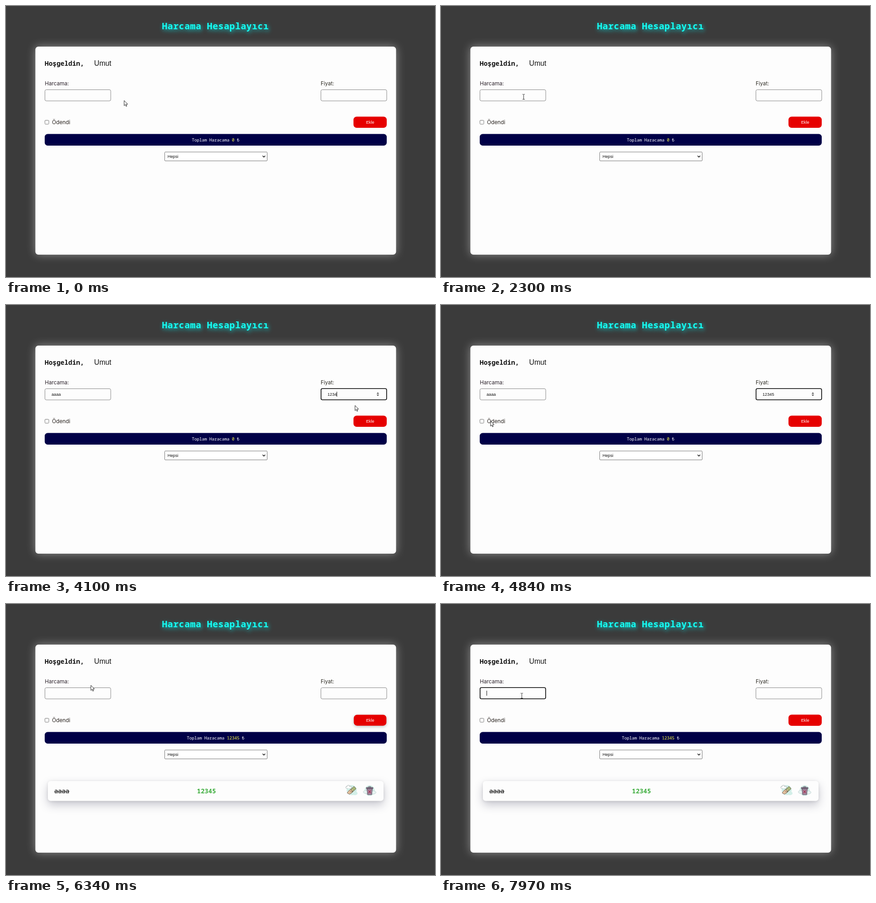
An HTML page with a canvas that plays this animation: 942 px wide and 594 px high, repeating every 8 s.

```html
<!DOCTYPE html>
<html lang="tr">
<head>
<meta charset="utf-8">
<title>Harcama Hesaplayıcı</title>
<style>
  html, body { margin: 0; width: 100%; height: 100%; overflow: hidden; background: #3b3b3b; }
  canvas { display: block; width: 942px; height: 594px; }
</style>
</head>
<body>
<canvas id="stage"></canvas>
<script>
const W = 942, H = 594, LOOP = 8000;
const canvas = document.getElementById('stage');
const ctx = canvas.getContext('2d');
const dpr = window.devicePixelRatio || 1;
canvas.width = W * dpr;
canvas.height = H * dpr;

const MONO = '"Noto Sans Mono", "DejaVu Sans Mono", monospace';
const LABEL = 'Inter, sans-serif';
const ARIAL = '"Liberation Sans", Arial, sans-serif';
const CARD = '#fdfdfd';

// Moments when the form changes
const AT = { focusName: 2560, focusPrice: 3380, check: 5010, add: 5960, refocus: 6500 };
const NAME_KEYS = [2700, 2800, 2900, 3000];
const PRICE_KEYS = [3620, 3760, 3900, 4040, 4190];

// Pointer path: time, x, y
const PATH = [
  [0, 259, 207], [120, 259, 207], [780, 152, 198], [950, 152, 198],
  [1500, 174, 201], [2200, 181, 199], [3020, 181, 199], [3340, 752, 197],
  [3800, 758, 200], [4060, 766, 220], [4300, 766, 220], [4900, 90, 255],
  [5120, 90, 255], [5620, 872, 252], [5690, 872, 252], [5860, 804, 256],
  [6040, 802, 256], [6310, 186, 178], [6370, 186, 178], [6470, 177, 199],
  [7000, 177, 201], [8000, 177, 201]
];

const clamp = v => Math.max(0, Math.min(1, v));
const ease = v => { v = clamp(v); return v * v * (3 - 2 * v); };
const typed = (keys, t) => keys.filter(k => t >= k).length;

function pointerAt(t) {
  const i = Math.max(1, PATH.findIndex(p => p[0] > t));
  const [t0, x0, y0] = PATH[i - 1], [t1, x1, y1] = PATH[i];
  const k = ease((t - t0) / (t1 - t0));
  return { x: x0 + (x1 - x0) * k, y: y0 + (y1 - y0) * k };
}

function caretOn(t, keys, start) {
  const last = keys.filter(k => k <= t).pop() || start;
  return (t - last) % 1000 < 500;
}

function text(str, x, y, font, color, spacing = 0) {
  ctx.font = font;
  ctx.letterSpacing = spacing + 'px';
  ctx.fillStyle = color;
  ctx.fillText(str, x, y);
  const width = ctx.measureText(str).width;
  ctx.letterSpacing = '0px';
  return width;
}

function box(x, y, w, h, r, fill, stroke, line = 1) {
  ctx.beginPath();
  ctx.roundRect(x, y, w, h, r);
  if (fill) { ctx.fillStyle = fill; ctx.fill(); }
  if (stroke) { ctx.strokeStyle = stroke; ctx.lineWidth = line; ctx.stroke(); }
}

function withShadow(color, blur, dx, dy, draw) {
  ctx.save();
  ctx.shadowColor = color;
  ctx.shadowBlur = blur * dpr;
  ctx.shadowOffsetX = dx * dpr;
  ctx.shadowOffsetY = dy * dpr;
  draw();
  ctx.restore();
}

function poly(points, fill, stroke, line = 1, closed = true) {
  ctx.beginPath();
  points.forEach(([x, y], i) => i ? ctx.lineTo(x, y) : ctx.moveTo(x, y));
  if (closed) ctx.closePath();
  if (fill) { ctx.fillStyle = fill; ctx.fill(); }
  if (stroke) { ctx.strokeStyle = stroke; ctx.lineWidth = line; ctx.stroke(); }
}

function oval(x, y, rx, ry, fill, stroke, line = 0.8) {
  ctx.beginPath();
  ctx.ellipse(x, y, rx, ry, 0, 0, Math.PI * 2);
  if (fill) { ctx.fillStyle = fill; ctx.fill(); }
  if (stroke) { ctx.strokeStyle = stroke; ctx.lineWidth = line; ctx.stroke(); }
}

function input(x, value, focused, caret) {
  if (focused) box(x + 0.75, 183.25, 144, 24.5, 3, CARD, '#000', 1.6);
  else box(x + 0.5, 183.5, 144.5, 24.5, 3, CARD, '#858585');
  const width = text(value, x + 15, 199, '9.2px ' + ARIAL, '#111');
  if (caret) {
    ctx.fillStyle = '#111';
    ctx.fillRect(Math.round(x + 14.6 + width), 190, 1, 11);
  }
}

function spinner(x, y) {
  poly([[x - 2.7, y - 1], [x + 2.7, y - 1], [x, y - 4]], '#444');
  poly([[x - 2.7, y + 1], [x + 2.7, y + 1], [x, y + 4]], '#444');
}

function checkbox(on) {
  if (!on) return box(85.5, 250.5, 8.5, 8.5, 1.5, '#fff', '#767676');
  box(85, 250, 9.5, 9.5, 1.5, '#0b75dd');
  poly([[87, 255], [89, 257], [92.7, 252.3]], null, '#fff', 1.4, false);
}

function button(hover) {
  const inset = 1.4 * hover;
  withShadow(`rgba(0,0,0,${0.5 * hover})`, 6, 0, 2, () =>
    box(763 + inset, 242.5 + inset / 2, 73 - inset * 2, 24.5 - inset, 7, '#e60000'));
  text('Ekle', 790.7, 258, '9.2px ' + ARIAL, '#fff');
}

function total(sum) {
  box(85, 280.5, 751, 25.5, 6.5, '#000047');
  const font = '9.6px ' + MONO, gap = -0.26;
  let x = sum ? 397 : 408;
  x += text('Toplam Haracama ', x, 297, font, '#fff', gap);
  x += text(String(sum), x, 297, font, '#ffff45', gap);
  text(' ₺', x, 297, font, '#fff', gap);
}

function select() {
  box(348.5, 320, 225, 19.5, 1.5, '#fff', '#767676');
  text('Hepsi', 354.8, 333, '9.2px ' + ARIAL, '#111');
  poly([[563.5, 328.3], [566.3, 331.2], [569.1, 328.3]], null, '#111', 1.5, false);
}

function payIcon(x, y) {
  oval(x + 1, y, 11, 11, '#d3efe8');
  oval(x + 8, y + 7, 6, 4, '#d3efe8');
  [[-9, -6, 3], [-6, -8, 3.5], [-2, -6, 3]].forEach(([dx, dy, r]) =>
    oval(x + dx, y + dy, r, r * 0.8, '#fff', '#8d9a9a', 0.7));
  ctx.fillStyle = '#fff';
  ctx.fillRect(x - 10, y - 7, 9, 3);
  ctx.save();
  ctx.translate(x + 3, y);
  ctx.rotate(-0.75);
  box(-7, -4, 15, 7, 1, '#a9b978', '#5d5b4c', 0.9);
  oval(0, -0.5, 2, 2, '#e1d6a0', '#6d7050', 0.6);
  ctx.restore();
  poly([[x - 9, y + 6], [x - 4, y], [x, y - 1], [x + 3, y + 2],
    [x + 1, y + 6], [x - 4, y + 9]], '#e7c39f', '#66564d', 0.9);
  poly([[x - 3, y + 4], [x + 1, y + 2], [x + 4, y + 4]], null, '#66564d', 0.8, false);
}

function binIcon(x, y) {
  oval(x, y, 11, 11.5, '#d3efe8');
  oval(x - 8, y + 3, 6, 3.5, '#e7f4f2', '#a7bdbb', 0.6);
  oval(x + 8, y + 4, 6, 3.5, '#e7f4f2', '#a7bdbb', 0.6);
  poly([[x - 6, y - 4], [x + 6, y - 4], [x + 4.5, y + 9], [x - 4.5, y + 9]],
    '#a58aa0', '#5d5062', 1);
  box(x - 7.5, y - 7, 15, 3, 1, '#806d83', '#51475a', 0.8);
  box(x - 2.5, y - 9, 5, 2, 0.8, null, '#51475a', 0.9);
  poly([[x - 2.8, y - 0.5], [x + 2.8, y + 5.5]], null, '#a83250', 1.4, false);
  poly([[x + 2.8, y - 0.5], [x - 2.8, y + 5.5]], null, '#a83250', 1.4, false);
}

function expenseRow() {
  withShadow('rgba(50,50,80,0.26)', 20, 0, 9, () => box(92, 388, 737, 43.5, 6, CARD));
  withShadow('rgba(0,0,0,0.10)', 6, 0, 1, () => box(92, 388, 737, 43.5, 6, CARD));
  const font = 'bold 13.8px ' + MONO;
  const width = text('aaaa', 106, 415, font, '#4a4a4a');
  ctx.fillStyle = '#333';
  ctx.fillRect(106, 410, width, 1.3);
  text('12345', 419.3, 415, 'bold 13.9px ' + MONO, '#3fae3f');
  payIcon(758, 408);
  binIcon(798.5, 409);
}

function arrow(x, y) {
  const shape = [[0, 0], [0, 11.2], [2.6, 8.8], [4.3, 12.8], [6, 12], [4.4, 8.2], [7.8, 8]];
  ctx.lineJoin = 'round';
  poly(shape.map(([dx, dy]) => [x + 0.4 + dx, y + 0.2 + dy]), '#fff', '#111', 0.9);
  ctx.lineJoin = 'miter';
}

function iBeam(x, y) {
  ctx.fillStyle = '#333';
  x = Math.round(x);
  y = Math.round(y);
  ctx.fillRect(x, y - 5, 1, 11);
  [-6, 5].forEach(dy => {
    ctx.fillRect(x - 2, y + dy, 2, 1);
    ctx.fillRect(x + 1, y + dy, 2, 1);
  });
}

function pointer(t) {
  const { x, y } = pointerAt(t);
  const inField = y > 183 && y < 208 && ((x > 85 && x < 230) || (x > 691 && x < 836));
  (inField && t > 860 ? iBeam : arrow)(x, y);
}

function page() {
  ctx.fillStyle = '#3b3b3b';
  ctx.fillRect(0, 0, W, H);
  withShadow('rgba(0,238,238,0.8)', 10, 2, 3, () =>
    text('Harcama Hesaplayıcı', 342.5, 51, 'bold 19.6px ' + MONO, '#14fff4', 0.6));
  withShadow('rgba(255,255,255,0.42)', 20, 0, 0, () => box(64.5, 89, 792, 456, 6.5, CARD));
  text('Hoşgeldin,', 85, 131, 'bold 14.4px ' + MONO, '#111');
  text('Umut', 193.5, 131, '15.8px ' + ARIAL, '#111');
  text('Harcama:', 85.2, 173.5, '11.7px ' + LABEL, '#2c222b');
  text('Fiyat:', 691, 173.5, '11.5px ' + LABEL, '#2c2a22');
  text('Ödendi', 101, 258.5, '11.8px ' + LABEL, '#2c2622');
}

function draw(t) {
  ctx.setTransform(dpr, 0, 0, dpr, 0, 0);
  const added = t >= AT.add;
  const nameFirst = t >= AT.focusName && t < AT.focusPrice;
  const nameAgain = t >= AT.refocus;
  const priceFocus = t >= AT.focusPrice && t < AT.check;
  const nameCaret = (nameFirst && caretOn(t, NAME_KEYS, AT.focusName)) ||
    (nameAgain && caretOn(t, [], AT.refocus));

  page();
  input(85, added ? '' : 'aaaa'.slice(0, typed(NAME_KEYS, t)), nameFirst || nameAgain, nameCaret);
  input(691, added ? '' : '12345'.slice(0, typed(PRICE_KEYS, t)), priceFocus,
    priceFocus && caretOn(t, PRICE_KEYS, AT.focusPrice));
  if (priceFocus) spinner(816.5, 195.5);
  checkbox(t >= AT.check && !added);
  button(ease((t - 5830) / 150) * (1 - ease((t - 6190) / 300)));
  total(added ? 12345 : 0);
  select();
  if (added) expenseRow();
  pointer(t);
}

const start = performance.now();
function frame() {
  draw((performance.now() - start) % LOOP);
  requestAnimationFrame(frame);
}
frame();
</script>
</body>
</html>
```
